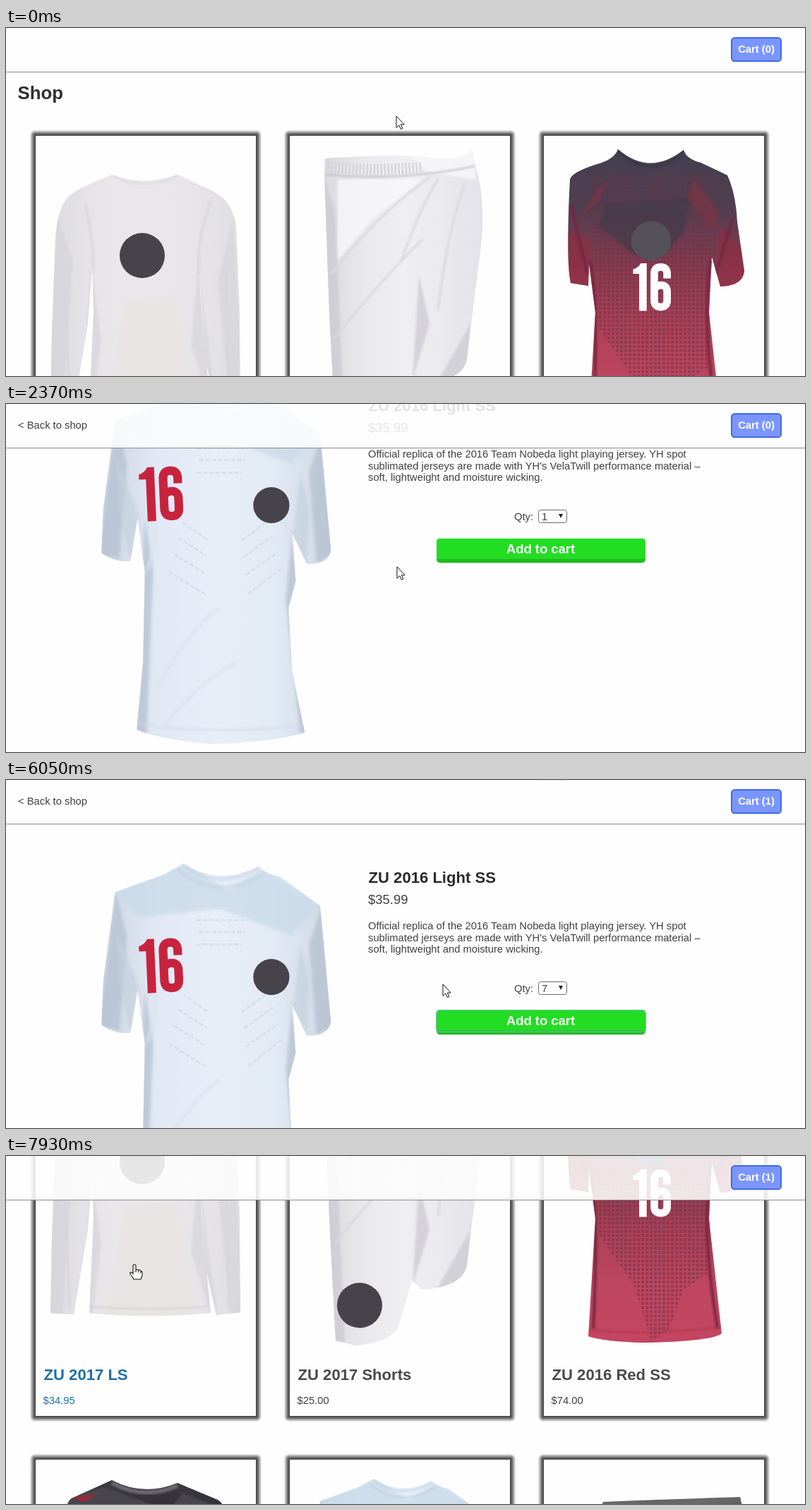
An HTML page for the animation above (8 s loop, 1132 by 494 pixels).

```html
<!DOCTYPE html>
<html lang="en">
<head>
<meta charset="utf-8">
<title>Shop</title>
<style>
  html, body { margin: 0; width: 100%; height: 100%; overflow: hidden; background: #fefefe; }
  svg { display: block; width: 1132px; height: 494px; }
  text { font-family: "Liberation Sans", Arial, sans-serif; font-size: 14.75px; fill: #404040; }
  .title { font-size: 22.1px; font-weight: bold; fill: #4a4a4a; }
  .dark { fill: #2b2b2b; }
  .shop { font-size: 25.8px; font-weight: bold; fill: #2f2f2f; }
  .price { font-size: 18.44px; }
  .button { font-size: 18.44px; font-weight: bold; fill: #fff; text-anchor: middle; }
  .cart { font-weight: bold; fill: #fff; text-anchor: middle; }
  .hover text, text.hover { fill: #1f6fa5; }
</style>
</head>
<body>
<svg id="stage" viewBox="0 0 1132 494"></svg>
<script>
const stage = document.getElementById('stage');

// ---- drawing helpers ----
const text = (x, y, s, cls = '', id = '') => `<text x="${x}" y="${y}" class="${cls}" id="${id}">${s}</text>`;
const rect = (x, y, w, h, fill, more = '') => `<rect x="${x}" y="${y}" width="${w}" height="${h}" fill="${fill}" ${more}/>`;
const crest = (x, y, r, fill = '#47434a') => `<circle cx="${x}" cy="${y}" r="${r}" fill="${fill}"/>`;
const folds = (d, color, width = 5) =>
  `<path d="${d}" fill="none" stroke="${color}" stroke-width="${width}" filter="url(#soft)"/>`;
const patch = (d, fill, opacity = 1) => `<path d="${d}" fill="${fill}" opacity="${opacity}" filter="url(#soft)"/>`;
const sixteen = (x, y, scale, color, turn = 0) => `
  <g transform="translate(${x} ${y}) rotate(${turn}) scale(${scale})">
    <path d="M0 8Q7 6 10 0H18V63H8V14H0Z" fill="${color}"/>
    <path d="M45 20V14Q45 5 36.5 5Q28 5 28 14V49Q28 58 36.5 58Q45 58 45 49V38Q45 29 37 29Q31 29 28 34"
      fill="none" stroke="${color}" stroke-width="10"/>
  </g>`;
const gradient = (id, down, ...stops) => `<linearGradient id="${id}" x2="${down ? 0 : 1}" y2="${down ? 1 : 0}">` +
  stops.map((c, i) => `<stop offset="${i / (stops.length - 1)}" stop-color="${c}"/>`).join('') + '</linearGradient>';
const garment = (id, d, fill, inside, over = '') => `
  <g id="${id}">
    <clipPath id="${id}Clip"><path d="${d}"/></clipPath>
    <path d="${d}" fill="${fill}"/>
    <g clip-path="url(#${id}Clip)">${inside}</g>${over}
  </g>`;

const longSleeve = garment('longSleeve',
  `M151 208Q195 226 243 208L292 231Q322 246 326 282L331 400L332 537L298 541L284 478L273 338
   Q278 420 290 538Q205 546 118 538L124 404L122 338L116 420L96 540L63 538L65 430L70 300Q72 255 90 238Q104 226 151 208Z`,
  'url(#pale)',
  patch('M70 260L95 330 80 540H60ZM322 270L300 360 318 540H335ZM120 340L135 440 122 545H110ZM272 340L262 450 292 545H300Z', '#d3d2d8', .6) +
  patch('M170 390L240 380 270 545H140Z', '#e9e3df', .6) +
  folds('M112 250Q128 320 122 350M290 245Q270 300 273 350M82 330L90 530M312 330L316 530', '#d6d5dc', 3) +
  folds('M120 528Q205 537 290 528', '#cfced3', 2) +
  folds('M151 210Q195 232 243 210', '#dadae0', 2),
  crest(193, 323, 32));

const paleShorts = garment('paleShorts',
  `M452 185Q560 178 600 184Q650 190 660 172L664 192Q682 245 671 325L661 404L653 470Q648 500 590 505L575 492
   L556 557Q545 580 495 584L467 577L458 404L451 206Z`,
  'url(#paleShort)',
  patch('M450 210L466 260 480 580H455ZM658 420L610 505H655ZM585 350L600 420 576 500Z', '#cbcad1', .75) +
  patch('M470 215H590L520 270 470 330ZM570 180L665 170V215L600 205Z', '#f8f8fa', .8) +
  folds('M612 214Q585 260 560 330M600 212Q520 270 460 350M590 300Q520 370 466 440M650 220Q625 290 612 400', '#d9d8de', 3) +
  folds('M452 208Q560 218 664 196', '#bdbcc4', 2) +
  `<path d="M456 197Q520 204 590 198" fill="none" stroke="#d3d2d8" stroke-width="16" stroke-dasharray="2 3"/>`,
  crest(501, 527, 32));

const redShirt = garment('redShirt',
  `M867 172Q912 211 960 173Q964 186 984 191L1022 209Q1034 235 1036 275L1046 345Q1044 366 1012 367L1000 325L996 404L1014 567
   Q1000 578 905 580Q850 579 825 571L835 404L826 335L825 366L800 362Q793 330 799 215Q801 205 835 194Q862 187 867 172Z`,
  'url(#redCloth)',
  rect(830, 205, 175, 140, 'url(#mesh)', 'opacity=".45"') +
  `<path d="M838 345H998L996 480 960 505 940 560 915 580 890 500 870 470 836 420Z" fill="url(#mesh)" opacity=".5"/>` +
  patch('M850 250L970 240 960 290 930 325 890 322 840 280Z', '#453b4c', .75) +
  patch('M855 215L840 245 810 275 840 225ZM975 215L1010 260 1000 290 965 240Z', '#7d3445', .7) +
  patch('M798 285L826 300V370H795ZM1010 280L1050 320V370H1010Z', '#8f2d45', .6) +
  folds('M828 330Q840 400 832 560M998 330Q985 420 1008 560M800 250L824 350M1030 270L1005 350', '#74283f', 4) +
  folds('M867 175Q912 218 960 176', '#3b3747', 4) +
  folds('M826 561Q905 572 1014 557', '#a1364f', 1.5),
  crest(914, 302, 28, '#55515a') + sixteen(888.5, 334, 1.07, '#fff'));

const darkShirt = garment('darkShirt',
  `M150 102Q195 126 243 106L300 130Q316 140 322 190L331 283Q328 292 297 285L283 253L276 250L285 340L288 470
   Q280 482 195 490Q125 486 104 475L112 300L113 252L108 283L70 282L66 276L80 160Q86 132 93 128Z`,
  'url(#darkCloth)',
  patch('M90 125L140 112 215 140 190 155 145 150 110 185 66 282ZM250 120L325 150 332 290 300 270 280 190 220 160Z', '#4c4a53', .85) +
  patch('M140 150L185 162 205 200 230 260 150 300 100 260Z', '#191619') +
  patch('M210 285L270 310 290 390 250 350 215 320Z', '#7c3735', .7) +
  patch('M195 440Q230 390 290 405V480Q240 500 205 470Z', '#861e29', .65) +
  patch('M110 360L190 400 160 415 108 410Z', '#53282a', .8) +
  patch('M94 126L130 122 110 133Z', '#9d2935') +
  folds('M150 106Q195 131 243 110', '#6c6a72', 6),
  crest(257, 223, 20, '#5b5960') + sixteen(114, 180, .99, '#fff', -1));

const whiteShirt = garment('whiteShirt',
  `M521 100Q560 126 604 103Q608 110 628 115L672 147L677 200L684 276Q681 292 657 291L641 257L645 310L637 340L641 410L655 478
   Q620 489 550 491Q490 485 469 475L476 400L478 300L470 240L462 288Q445 290 430 279L432 230L445 132L500 112Z`,
  'url(#whiteCloth)',
  patch('M446 132L458 180 450 285 428 280ZM674 147L660 190 668 290 686 280ZM478 240L487 300 480 480H465ZM642 250L634 330 650 480H660Z', '#b4c0d0', .75) +
  patch('M446 130L521 100 570 130 610 105 672 148 640 180 560 150 470 160Z', '#c9dae8', .75) +
  patch('M446 170L472 240 462 290 452 240ZM650 190L642 258 657 290 660 230Z', '#c5d0de', .7) +
  `<path d="M535 150H590M535 163H592M538 176H590M535 190H585M520 245L548 265M515 262L546 282M510 280L545 302M505 300L545 325M585 265L612 245
    M588 283L620 260M590 303L626 278M592 325L630 295" stroke="#d9e0ea" stroke-width="2.5" stroke-dasharray="5 2"/>` +
  folds('M490 430Q530 360 560 340M500 470Q540 420 580 400M482 200Q500 250 480 300M640 210Q628 250 642 270', '#d9e1ed', 2.5) +
  folds('M521 102Q560 131 604 105M514 106Q556 144 610 112', '#bfcfde', 2) +
  folds('M470 468Q550 482 654 470', '#ccd5e2', 1.5),
  crest(618, 226, 20) + sixteen(471, 184.5, .95, '#c8233e', -2.5));

const grayShorts = garment('grayShorts',
  `M846 133Q920 130 1040 126Q1044 140 1043 154L1050 205Q1050 250 1042 330L1044 410L1052 443Q1000 460 965 459
   Q935 448 905 448Q900 466 820 473Q795 472 786 465L798 350L812 260L838 165Q840 145 846 133Z`,
  'url(#grayCloth)',
  patch('M924 285L930 330 925 450H895L915 400ZM838 165L825 280 800 470H780Z', '#505050', .7) +
  patch('M935 180L1030 200 1035 420 950 440Z', '#6f6f6f', .5) +
  folds('M924 155Q935 210 925 290L910 435M850 175Q900 230 918 300M885 230L860 420M915 310L850 420M870 180L825 400', '#585858', 3) +
  folds('M840 153Q930 157 1046 148M844 141Q930 144 1044 136', '#4d4d4d', 2));

const defs = `<defs>
  <filter id="soft" x="-20%" y="-20%" width="140%" height="140%"><feGaussianBlur stdDeviation="1.6"/></filter>
  <pattern id="mesh" width="6" height="6" patternUnits="userSpaceOnUse"><rect width="4" height="4" fill="#6c3348"/></pattern>
  ${gradient('pale', 0, '#dddce1', '#e9e7ea', '#e8e6ea', '#e0dfe4')}
  ${gradient('paleShort', 0, '#dad9df', '#e9e8ec', '#efeef1', '#eae9ee', '#e3e2e8')}
  ${gradient('redCloth', 1, '#433f50', '#503e50', '#863a4e', '#ab4057', '#bf4660', '#c5455f')}
  ${gradient('darkCloth', 1, '#3c3a42', '#252126', '#2b2023', '#3d2224', '#3a191d')}
  ${gradient('whiteCloth', 0, '#cbd5e2', '#e2e9f4', '#e7eef8', '#e2eaf4', '#ced8e4')}
  ${gradient('grayCloth', 0, '#606060', '#686868', '#646464', '#6a6a6a', '#626262')}
  ${whiteShirt}
</defs>`;

// ---- shop page ----
const shadows = [[15, '#ededed'], [12, '#c8c8c8'], [9, '#9a9a9a'], [6, '#757575'], [3, '#575757']];
const cardX = [41, 401, 761], cardW = 314, cardH = 533, rowY = [152, 745];
const card = (col, row, title = '', price = '') => {
  const x = cardX[col], y = rowY[row];
  const edge = shadows.map(([w, c]) => rect(x, y, cardW, cardH, 'none', `stroke="${c}" stroke-width="${w}" stroke-linejoin="round"`)).join('');
  return `<g class="card">${edge}${rect(x + .5, y + .5, cardW - 1, cardH - 1, '#fefefe', 'stroke="#444"')}
    ${text(x + 12.5, y + 481, title, 'title')}${text(x + 11.5, y + 514.5, price)}</g>`;
};
const shop = `<g id="shop">
  ${text(16.5, 101, 'Shop', 'shop')}
  ${card(0, 0, 'ZU 2017 LS', '$34.95')}${card(1, 0, 'ZU 2017 Shorts', '$25.00')}${card(2, 0, 'ZU 2016 Red SS', '$74.00')}
  ${card(0, 1)}${card(1, 1)}${card(2, 1)}
  ${longSleeve}${paleShorts}${redShirt}
  <g transform="translate(0 673)">${darkShirt}<use href="#whiteShirt"/>${grayShorts}</g>
</g>`;

// ---- product page ----
const options = 15, optionH = 19;
const detail = `<g id="detail">
  <use href="#whiteShirt" transform="translate(134 119) scale(1.28) translate(-429 -100.5)"/>
  ${text(513.5, 146, 'ZU 2016 Light SS', 'title dark')}
  ${text(513, 175.5, '$35.99', 'price')}
  ${text(513, 212, 'Official replica of the 2016 Team Nobeda light playing jersey. YH spot')}
  ${text(513, 228.5, "sublimated jerseys are made with YH's VelaTwill performance material –")}
  ${text(513, 245, 'soft, lightweight and moisture wicking.')}
  ${text(720, 301, 'Qty:')}
  ${rect(754.5, 286.5, 40, 18, '#fff', 'id="select" rx="3" stroke="#6b6b6b"')}
  ${text(759, 301, '1', '', 'qty')}
  <path d="M783 292H789L786 298Z" fill="#222"/>
  ${rect(610, 327, 296, 34.5, '#22b922', 'rx="5"')}
  <path d="M610 356V332Q610 327 615 327H901Q906 327 906 332V356Z" fill="#22dd22"/>
  ${rect(609.5, 326.5, 297, 31, 'none', 'id="focus" rx="3" stroke="#7fb6d8"')}
  ${text(757.5, 348, 'Add to cart', 'button')}
</g>`;

const header = `
  ${rect(0, 0, 1132, 62, '#fefefe', 'fill-opacity=".87"')}${rect(0, 62, 1132, 1, '#8c8c8c')}
  ${text(17, 35.3, '&lt; Back to shop', '', 'back')}
  ${rect(1028, 14, 70, 33, '#7b96ff', 'rx="4.5" stroke="#4166ee" stroke-width="2"')}
  ${text(1063, 35.3, 'Cart (0)', 'cart', 'cart')}
  ${rect(753, 0, 42, 1, '#ececec', 'id="trace"')}`;

const popup = `<g id="popup">
  ${rect(753.5, .5, 41, 285, '#fff', 'stroke="#8a8a8a"')}${rect(754, 0, 40, optionH, '#1e90ff', 'id="mark"')}
  ${Array.from({ length: options }, (_, i) => text(759, i * optionH + 14.5, i + 1, 'option')).join('')}
</g>`;

const pointers = `
  <path id="arrow" d="M0 0V16.5L3.8 13 6.4 18.6 8.8 17.5 6.3 12H11.2Z" fill="#fff" stroke="#111"/>
  <path id="hand" d="M-2 2Q-2 0 0 0T2 2V8Q4 6.500 6 8Q8 7 9 9.500Q11 9 11 12V16Q10 18 9 21H-1Q-3 17 -6 13.500Q-7 11 -5 11
    Q-3 11.500 -2 13ZM2 8V11M6 8.500V11.500M9 10V12" fill="#fff" stroke="#111" stroke-width="1.1"/>`;

stage.innerHTML = defs + shop + detail + header + popup + pointers;
const el = id => document.getElementById(id);
const cards = [...document.querySelectorAll('.card')], optionTexts = [...document.querySelectorAll('.option')];

// ---- timing ----
const loop = 8000;
// start, end and number of picture changes in each run
const runs = [[530, 1510, 8], [1660, 1660, 1], [1940, 2060, 2], [2370, 3340, 8], [3480, 3480, 1],
  [3760, 4550, 7], [4810, 5480, 6], [5780, 6740, 8], [6870, 7810, 7], [7930, 7930, 1]];
const steps = [0, ...runs.flatMap(([a, b, n]) => Array.from({ length: n }, (_, i) => n > 1 ? a + (b - a) * i / (n - 1) : a))];
const snap = 12;

const shopScroll = [[400, 0], [810, 342], [1370, 673], [1510, 673], [1660, 690], [1940, 690], [1941, 0], [7340, 0], [7930, 315]];
const detailScroll = [[2230, 180], [2800, 0]];
const pointerPath = [[0, 553, 125], [530, 553, 125], [810, 554, 127], [1090, 554, 127], [1510, 554, 231], [2370, 554, 231],
  [3340, 774, 300], [3760, 774, 296], [4420, 768, 124], [4550, 768, 124], [5078, 774, 236], [5480, 736, 347],
  [5900, 736, 347], [6740, 98, 36], [7027, 99, 33], [7340, 99, 35], [7810, 180, 150], [7930, 182, 154]];

function track(keys, t) {
  const i = keys.findIndex(k => k[0] > t);
  if (i < 0) return keys[keys.length - 1].slice(1);
  if (i === 0) return keys[0].slice(1);
  const a = keys[i - 1], b = keys[i], p = (t - a[0]) / (b[0] - a[0]);
  return a.slice(1).map((v, j) => v + (b[j + 1] - v) * p);
}

const show = (id, on) => el(id).setAttribute('display', on ? 'inline' : 'none');
const move = (id, x, y) => el(id).setAttribute('transform', `translate(${Math.round(x)} ${Math.round(y)})`);

function draw(now) {
  const t = steps.filter(s => s <= now + snap).pop();
  const onDetail = t >= 1940 && t < 7180;
  const [x, y] = track(pointerPath, t), [scroll] = track(shopScroll, t), [lift] = track(detailScroll, t);
  const open = t >= 3480 && t < 4810, chosen = t >= 4810, added = t >= 5900;

  show('shop', !onDetail);
  show('detail', onDetail);
  show('back', onDetail);
  show('popup', open);
  show('trace', onDetail && chosen);
  show('focus', t >= 5780);
  move('shop', 0, -scroll);
  move('detail', 0, -lift);

  const overCard = cards.map((_, i) => {
    const dx = x - cardX[i % 3], dy = y + scroll - rowY[Math.floor(i / 3)];
    return !onDetail && y > 62 && dx > 0 && dx < cardW && dy > 0 && dy < cardH;
  });
  cards.forEach((c, i) => c.classList.toggle('hover', overCard[i]));
  const overBack = onDetail && x > 17 && x < 116 && y > 22 && y < 42;
  const overButton = onDetail && x > 610 && x < 906 && y > 327 - lift && y < 361 - lift;
  el('back').classList.toggle('hover', overBack);

  const row = y > 286 ? 0 : Math.floor(y / optionH);
  move('mark', 0, row * optionH);
  optionTexts.forEach((o, i) => o.style.fill = i === row ? '#fff' : '#222');
  el('qty').textContent = chosen ? '7' : '1';
  el('select').setAttribute('stroke', t >= 3480 && t < 5780 ? '#4f6fae' : '#6b6b6b');
  el('cart').textContent = `Cart (${added ? 1 : 0})`;

  const hand = overBack || overButton || overCard.includes(true);
  show('hand', hand);
  show('arrow', !hand);
  move(hand ? 'hand' : 'arrow', x, y);
}

const start = performance.now();
function tick() {
  draw((performance.now() - start) % loop);
  requestAnimationFrame(tick);
}
tick();
</script>
</body>
</html>
```
